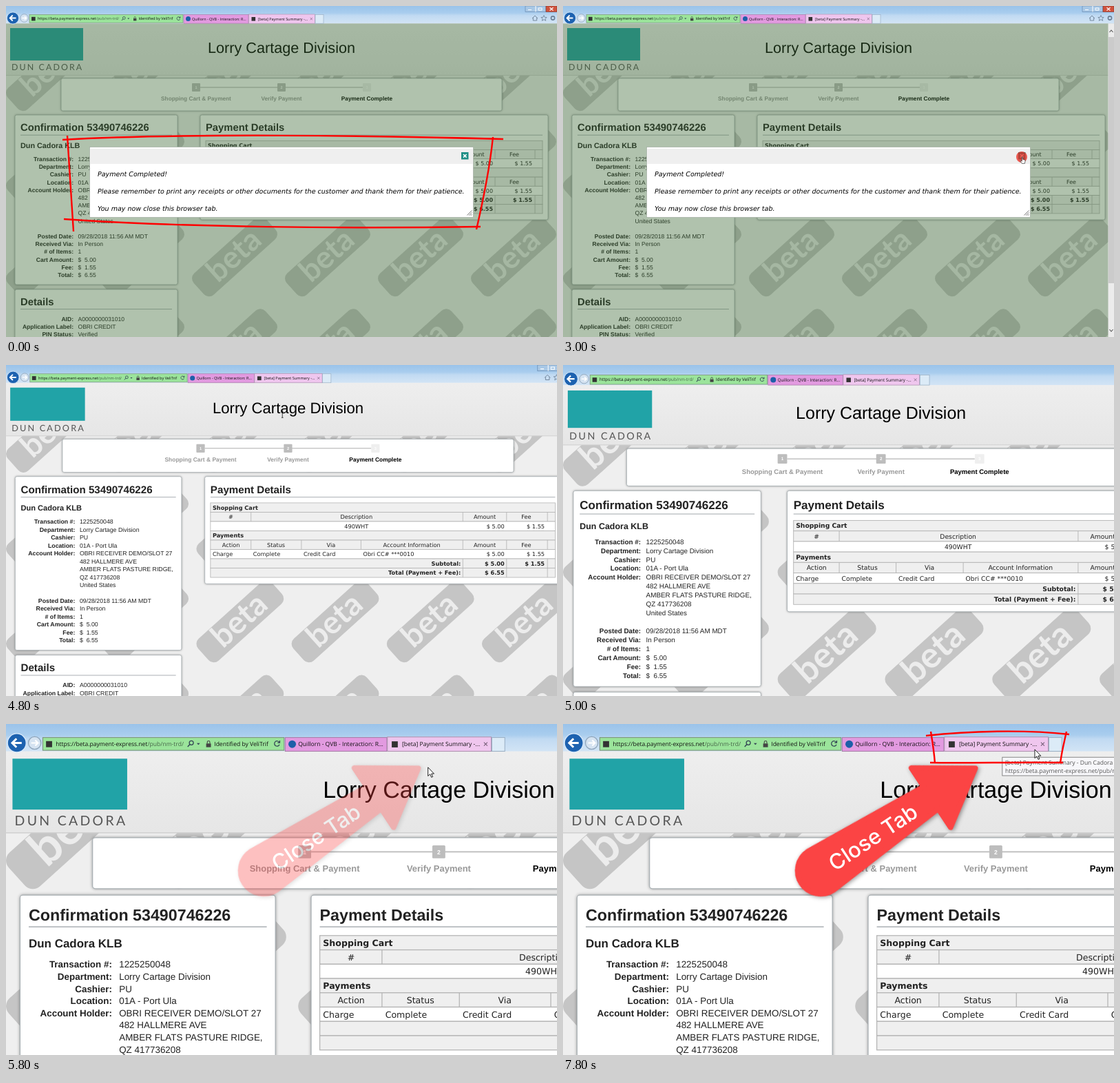
Animation, 800 px wide and 480 px high, one loop 8000 ms. Source, as an HTML page:

```html
<!DOCTYPE html>
<html lang="en">
<head>
<meta charset="utf-8">
<title>Payment summary</title>
<style>
html, body { margin: 0; width: 100%; height: 100%; overflow: hidden; }
svg { display: block; width: 800px; height: 480px; text-rendering: geometricPrecision; }
text { white-space: pre; fill: #222; }
.ui { font: 5.45px "Open Sans", "Noto Sans", sans-serif; fill: #111; }
.label, .value { font: 8.55px "Liberation Sans", sans-serif; }
.label { font-weight: bold; text-anchor: end; }
.heading { font: bold 14.8px "Liberation Sans", sans-serif; }
.sub { font: bold 10.8px "Liberation Sans", sans-serif; }
.title { font: 21.65px "Liberation Sans", sans-serif; text-anchor: middle; fill: #000; }
.step { font: bold 8.25px "Liberation Sans", sans-serif; text-anchor: middle; }
.num { font: bold 5.5px "Liberation Sans", sans-serif; text-anchor: middle; fill: #fff; }
.cell { font: 8px "DejaVu Sans", sans-serif; }
.bold { font-weight: bold; }
.mid { text-anchor: middle; }
.end { text-anchor: end; }
.note { font: oblique 9.55px "DejaVu Sans", sans-serif; fill: #000; }
.beta { font: bold 45px Lato, sans-serif; text-anchor: middle; fill: #ececec; }
.caption { font: 12.4px Lato, sans-serif; letter-spacing: 2.1px; fill: #555; }
.arrowText { font: 500 31px Inter, sans-serif; text-anchor: middle; fill: #fff; }
.card { fill: #fff; stroke: #a9b0b4; stroke-width: .8; filter: drop-shadow(0 0 1.5px rgba(0,0,0,.35)); }
.sketch path { fill: none; stroke: #f00; stroke-width: 2.4; }
.line { stroke: #b4b4b4; stroke-width: .8; }
</style>
</head>
<body>
<svg id="stage" viewBox="0 0 800 480"></svg>
<script>
const LOOP = 8000, STEP = 200;
const TEAL = '#21a3a7';

const esc = s => s.replace(/&/g, '&amp;');
const text = (x, y, s, cls, extra = '') => `<text x="${x}" y="${y}" class="${cls}" ${extra}>${esc(s)}</text>`;
const rect = (x, y, w, h, fill, extra = '') => `<rect x="${x}" y="${y}" width="${w}" height="${h}" fill="${fill}" ${extra}/>`;
const path = (d, extra = '') => `<path d="${d}" ${extra}/>`;
const card = (x, y, w, h) => `<rect class="card" x="${x}" y="${y}" width="${w}" height="${h}" rx="2.5"/>`;
const rule = (x1, y, x2) => path(`M${x1},${y}H${x2}`, 'stroke="#999fa5" stroke-width=".8"');

function background() {
  let out = rect(0, 25, 800, 455, '#efefef');
  for (let row = 0; row < 4; row++)
    for (let col = -1; col < 7; col++)
      out += `<use href="#tag" x="${62 + col * 135}" y="${94 + row * 134.5}"/>`;
  return out;
}

function header() {
  const steps = [[276, 'Shopping Cart & Payment', '#999'], [400, 'Verify Payment', '#999'], [524, 'Payment Complete', '#000']];
  let out = rect(0, 25, 800, 75.5, 'url(#head)') + rect(0, 100, 800, .9, '#cfcfcf')
    + rect(6, 32, 106, 47, TEAL)
    + text(8, 93.3, 'DUN CADORA', 'caption')
    + text(400, 68, 'Lorry Cartage Division', 'title')
    + card(80, 105, 640, 47) + rect(282, 117.4, 236, 1.2, '#bdbdbd');
  steps.forEach(([x, name, color], i) => {
    out += rect(x - 6, 112, 12, 12, i < 2 ? '#bdbdbd' : '#efefef', 'rx="1"')
      + text(x, 120, String(i + 1), 'num')
      + text(x, 136.5, name, 'step', `style="fill:${color}"`);
  });
  return out;
}

function fields(rows, top) {
  return rows.map(([name, value], i) => {
    const y = (top + i * 11.2).toFixed(1);
    return text(98, y, name && name + ':', 'label') + text(104.5, y, value, 'value');
  }).join('');
}

function leftCards() {
  const confirm = [
    ['Transaction #', '1225250048'], ['Department', 'Lorry Cartage Division'], ['Cashier', 'PU'],
    ['Location', '01A - Port Ula'], ['Account Holder', 'OBRI RECEIVER DEMO/SLOT 27'],
    ['', '482 HALLMERE AVE'], ['', 'AMBER FLATS PASTURE RIDGE,'], ['', 'QZ 417736208'], ['', 'United States'],
    ['', ''], ['Posted Date', '09/28/2018 11:56 AM MDT'], ['Received Via', 'In Person'], ['# of Items', '1'],
    ['Cart Amount', '$  5.00'], ['Fee', '$  1.55'], ['Total', '$  6.55']];
  const details = [['AID', 'A0000000031010'], ['Application Label', 'OBRI CREDIT'], ['PIN Status', 'Verified']];
  return card(13, 158, 236, 246) + text(21, 181.3, 'Confirmation 53490746226', 'heading') + rule(21, 187.2, 241)
    + text(21, 206, 'Dun Cadora KLB', 'sub') + fields(confirm, 225)
    + card(13, 411, 236, 90) + text(21, 433.6, 'Details', 'heading') + rule(21, 439.6, 241) + fields(details, 456.5);
}

function paymentCard() {
  const H = 13.2, top = 195.3, left = 290, right = 779;
  const rowY = i => top + i * H;
  const base = i => (rowY(i) + 9.6).toFixed(1);
  const money = [648, 710, 768];
  const put = (i, x, s, cls = '') => text(x, base(i), s, 'cell ' + cls);
  const cols = (i, xs) => xs.map(x => path(`M${x},${rowY(i)}v${H}`, 'class="line"')).join('');
  let out = card(282, 158, 505, 152) + text(290, 181.3, 'Payment Details', 'heading') + rule(290, 187.2, 779);
  for (let i = 0; i < 8; i++)
    out += rect(left, rowY(i), right - left, H, i === 2 || i === 5 ? '#fff' : '#efefef', 'class="line"');
  out += cols(1, [347.5, ...money]) + cols(4, [347.5, 419, 503.5, ...money]) + cols(6, money) + cols(7, money);
  out += put(0, 293, 'Shopping Cart', 'bold') + put(3, 293, 'Payments', 'bold');
  [[319, '#'], [497, 'Description'], [679, 'Amount'], [738, 'Fee']].forEach(([x, s]) => out += put(1, x, s, 'mid'));
  [[319, 'Action'], [383, 'Status'], [461, 'Via'], [575.5, 'Account Information'], [679, 'Amount'], [738, 'Fee']]
    .forEach(([x, s]) => out += put(4, x, s, 'mid'));
  out += put(2, 497, '490WHT', 'mid');
  [[293, 'Charge'], [350.5, 'Complete'], [422, 'Credit Card'], [506.5, 'Obri CC# ***0010']]
    .forEach(([x, s]) => out += put(5, x, s));
  [2, 5].forEach(i => out += put(i, 707, '$ 5.00', 'end') + put(i, 764, '$ 1.55', 'end'));
  return out + put(6, 645, 'Subtotal:', 'bold end') + put(6, 707, '$ 5.00', 'bold end') + put(6, 764, '$ 1.55', 'bold end')
    + put(7, 645, 'Total (Payment + Fee):', 'bold end') + put(7, 707, '$ 6.55', 'bold end');
}

function chrome() {
  const line = (d, color, w = .9) => path(d, `fill="none" stroke="${color}" stroke-width="${w}"`);
  return rect(0, 0, 800, 25.2, 'url(#sky)')
    + rect(754, 0, 30, 8.5, '#a9c8e6', 'stroke="#5a7fa8" stroke-width=".6"')
    + rect(784, 0, 16, 8.5, '#d0523c', 'stroke="#7a2f25" stroke-width=".6"')
    + line('M758,5.5h5M769,0V8.5M773,3h5v3h-5z', '#fff', 1) + line('M789.5,2.2l5,4.4m0,-4.4l-5,4.4', '#fff', 1.2)
    + line('M764,18l4,-4l4,4M765.3,17v4h5.4v-4', '#6b7f95')
    + line('M781,13.5l1.2,2.8 3,.2-2.3,1.9 .8,2.9-2.7,-1.6-2.7,1.6 .8,-2.9-2.3,-1.9 3,-.2z', '#6b7f95', .8)
    + '<circle cx="794" cy="17.5" r="2.6" fill="none" stroke="#6b7f95" stroke-width="1.6"/>'
    + '<circle cx="10" cy="17.5" r="8.6" fill="#1d62b0" stroke="#dcebfa" stroke-width=".8"/>'
    + line('M14.5,17.5H6M9.7,13.5l-4,4l4,4', '#fff', 1.9)
    + '<circle cx="26.5" cy="17.5" r="5.8" fill="#d5e3f1" stroke="#8fa5bb" stroke-width=".8"/>'
    + line('M23.3,17.5h6M27,15l2.6,2.5l-2.6,2.5', '#fff', 1.3)
    + rect(34, 12.5, 223, 11.8, '#9be49b', 'stroke="#7d947d" stroke-width=".7"')
    + rect(37, 15.8, 5.6, 5.6, '#333')
    + '<text x="46" y="20.3" class="ui">https://beta.payment-express.net<tspan fill="#47654a">/pub/nm-trd/</tspan></text>'
    + '<circle cx="171.3" cy="17.4" r="1.9" fill="none" stroke="#345" stroke-width=".8"/>'
    + line('M169.9,18.8l-2,2.2', '#345', .9) + path('M176.3,17.6h3l-1.5,1.7z', 'fill="#345"')
    + rect(185, 18, 4.4, 3.4, '#444') + line('M186,18v-1.2a1.2,1.2 0 0 1 2.4,0V18', '#444', .7)
    + text(192.4, 20.3, 'Identified by VeliTrif', 'ui')
    + line('M252.6,17a2.4,2.4 0 1 0 .1,2M253,15.3v2h-2', '#345', .8)
    + rect(258, 12.5, 94, 12.7, '#e29ae0', 'stroke="#a076a0" stroke-width=".6"')
    + '<circle cx="264.5" cy="18.6" r="3.5" fill="#1d5fa8"/>'
    + text(270, 20.5, 'Quillorn - QVB - Interaction: R...', 'ui')
    + rect(352.5, 12, 96, 13.2, '#efc6ee', 'stroke="#a88aa8" stroke-width=".6"')
    + rect(356.5, 16, 5.6, 5.6, '#333')
    + text(366, 20.5, '[beta] Payment Summary -...', 'ui')
    + line('M441.7,17l3.2,3.2m0,-3.2l-3.2,3.2', '#77607a', .7)
    + rect(449, 12.5, 12, 12.7, '#dcebf7', 'stroke="#93a9bf" stroke-width=".6"');
}

const popup = () => rect(0, 25.2, 800, 455, 'rgba(58,104,50,.4)')
  + rect(121.5, 204.5, 557, 102, '#fff', 'stroke="#a0aca0" stroke-width=".7"')
  + rect(122.5, 207, 555, 22, '#efefef')
  + rect(661, 212, 10.5, 10.5, '#1f8f86')
  + path('M664,215l4.6,4.6m0,-4.6l-4.6,4.6', 'stroke="#fff" stroke-width="1.6"')
  + text(133, 247.3, 'Payment Completed!', 'note')
  + text(133, 271.8, 'Please remember to print any receipts or other documents for the customer and thank them for their patience.', 'note')
  + text(133, 296.5, 'You may now close this browser tab.', 'note')
  + path('M669.5,303.5l7,-7M672,303.8l4.5,-4.5M674.5,304l2,-2', 'stroke="#555" stroke-width=".8"');

const scrollbar = () => rect(791.5, 25.2, 8.5, 455, '#ececec') + rect(792, 45, 8, 357, '#cbcbcb')
  + path('M793.5,38l2.5,-3l2.5,3M793.5,469l2.5,3l2.5,-3', 'fill="none" stroke="#555" stroke-width="1.1"');

const tooltip = () => rect(406, 30.7, 140, 17, '#f7f7fa', 'stroke="#808080" stroke-width=".6"')
  + text(408.7, 37.6, '[beta] Payment Summary - Dun Cadora KLB', 'ui', 'style="fill:#555"')
  + text(408.7, 45, 'https://beta.payment-express.net/pub/nm-trd/', 'ui', 'style="fill:#555"');

const cursors = `<g id="cursor">
  <path id="arrowCur" d="M0,0V8l1.9,-1.7 1.3,2.9 1.2,-.5-1.2,-2.8h2.4z" fill="#fff" stroke="#000" stroke-width=".55"/>
  <path id="beamCur" d="M-1.3,-4.5h2.6M0,-4.5v9M-1.3,4.5h2.6" fill="none" stroke="#000" stroke-width=".7"/>
  <path id="handCur" d="M-.7,0q.7,-.9 1.4,0v3.4l3,.9q.6,.3.4,1.2l-.7,3.9h-4l-2.5,-3.6q0,-1 1,-.7l1.4,1.1z" fill="#fff" stroke="#000" stroke-width=".55"/></g>`;

const boxSketch = [
  'M89,188C92,235 95,280 98,327', 'M84,309C250,321 500,323 689,320',
  'M707,190C702,240 692,285 683,324', 'M82,194C250,184 540,188 722,193'];
const tabSketch = [
  ['M534,11C537,29 539,43 540,57', 0, .09], ['M533,56C580,57 670,55 726,56', .09, .48],
  ['M722,57C724,40 728,25 731,11', .48, .57], ['M735,15C670,8 590,10 527,17', .57, 1]];

const stage = document.getElementById('stage');
stage.innerHTML = `<defs>
  <linearGradient id="sky" x1="0" y1="0" x2="0" y2="1"><stop offset="0" stop-color="#9ac3ea"/><stop offset=".4" stop-color="#a9cdee"/><stop offset=".55" stop-color="#c1daf2"/><stop offset="1" stop-color="#d2e4f5"/></linearGradient>
  <linearGradient id="head" x1="0" y1="0" x2="0" y2="1"><stop offset="0" stop-color="#eeeeee"/><stop offset="1" stop-color="#e6e6e6"/></linearGradient>
  <g id="tag"><g transform="rotate(-42)"><rect x="-70" y="-21" width="140" height="42" rx="10" fill="#c5c5c5"/><text class="beta" y="13">beta</text></g></g>
</defs>
<g id="zoom">${background()}${header()}${leftCards()}${paymentCard()}
  <g id="popup">${popup()}</g>
  <g id="scroll">${scrollbar()}</g>
  ${chrome()}
  <circle id="click" cx="666" cy="219" fill="#e8281e" fill-opacity=".75"/>
  <g id="tip">${tooltip()}</g>${cursors}</g>
<g id="box" class="sketch">${boxSketch.map(d => path(d)).join('')}</g>
<g id="arrow" transform="translate(531 109) rotate(-33.5)">
  <path d="M-188,-33.5L4,-19V-51.5L81,0L4,51.5V19L-188,33.5A33.5,33.5 0 0 1 -188,-33.5Z" fill="#fb4444" stroke="#fb4444" stroke-width="8" stroke-linejoin="round" style="filter:drop-shadow(1px 2px 3px rgba(0,0,0,.4))"/>
  <text class="arrowText" x="-98" y="12.5">Close Tab</text></g>
<g id="tab" class="sketch">${tabSketch.map(([d]) => path(d, 'pathLength="100"')).join('')}</g>`;

const $ = id => document.getElementById(id);
const clamp = v => Math.max(0, Math.min(1, v));
const ramp = (t, a, b) => clamp((t - a) / (b - a));
const show = (id, on) => { $(id).style.display = on ? '' : 'none'; };

// time, x, y in page units
const track = [
  [200, 402, 440], [1200, 575, 285], [1800, 655, 228], [2200, 667, 219], [3200, 667, 219], [3600, 684, 230],
  [3800, 630, 214], [4000, 570, 198], [4200, 570, 198], [4400, 530, 168], [4600, 460, 112], [4800, 392, 70],
  [5000, 374, 61], [5400, 380, 61], [5600, 382, 58], [5800, 390, 40], [6200, 406, 23], [7400, 406, 23], [7800, 436, 23.5]];

function cursorAt(t) {
  const i = Math.max(1, track.findIndex(k => k[0] >= t));
  const [a, b] = [track[i - 1], track[i]];
  const u = ramp(t, a[0], b[0]);
  return [a[1] + (b[1] - a[1]) * u, a[2] + (b[2] - a[2]) * u];
}

function draw(t) {
  const scale = 1 + .571 * (1 - Math.cos(Math.PI * ramp(t, 4680, 5600))) / 2;
  $('zoom').setAttribute('transform', `scale(${scale})`);
  show('popup', t < 3200);
  show('scroll', t >= STEP);
  show('tip', t >= 7000);

  $('box').style.opacity = 1 - ramp(t, 1200, 2400);
  show('click', t >= 2600 && t < 3200);
  $('click').setAttribute('r', 8 * ramp(t, 2400, 3000));

  show('cursor', t >= STEP);
  $('cursor').setAttribute('transform', `translate(${cursorAt(t)})`);
  const hand = t >= 2200 && t <= 3200, beam = t >= 4800 && t <= 5600;
  show('handCur', hand);
  show('beamCur', beam);
  show('arrowCur', !hand && !beam);

  $('arrow').style.opacity = ramp(t, 5600, 6200);
  const drawn = ramp(t, 5920, 7200);
  [...$('tab').children].forEach((el, i) => {
    const part = ramp(drawn, tabSketch[i][1], tabSketch[i][2]);
    el.style.display = part ? '' : 'none';
    el.setAttribute('stroke-dasharray', `${part * 100} 200`);
  });
}

function tick() {
  draw(Math.floor(performance.now() % LOOP / STEP) * STEP);
  requestAnimationFrame(tick);
}
tick();
</script>
</body>
</html>
```
